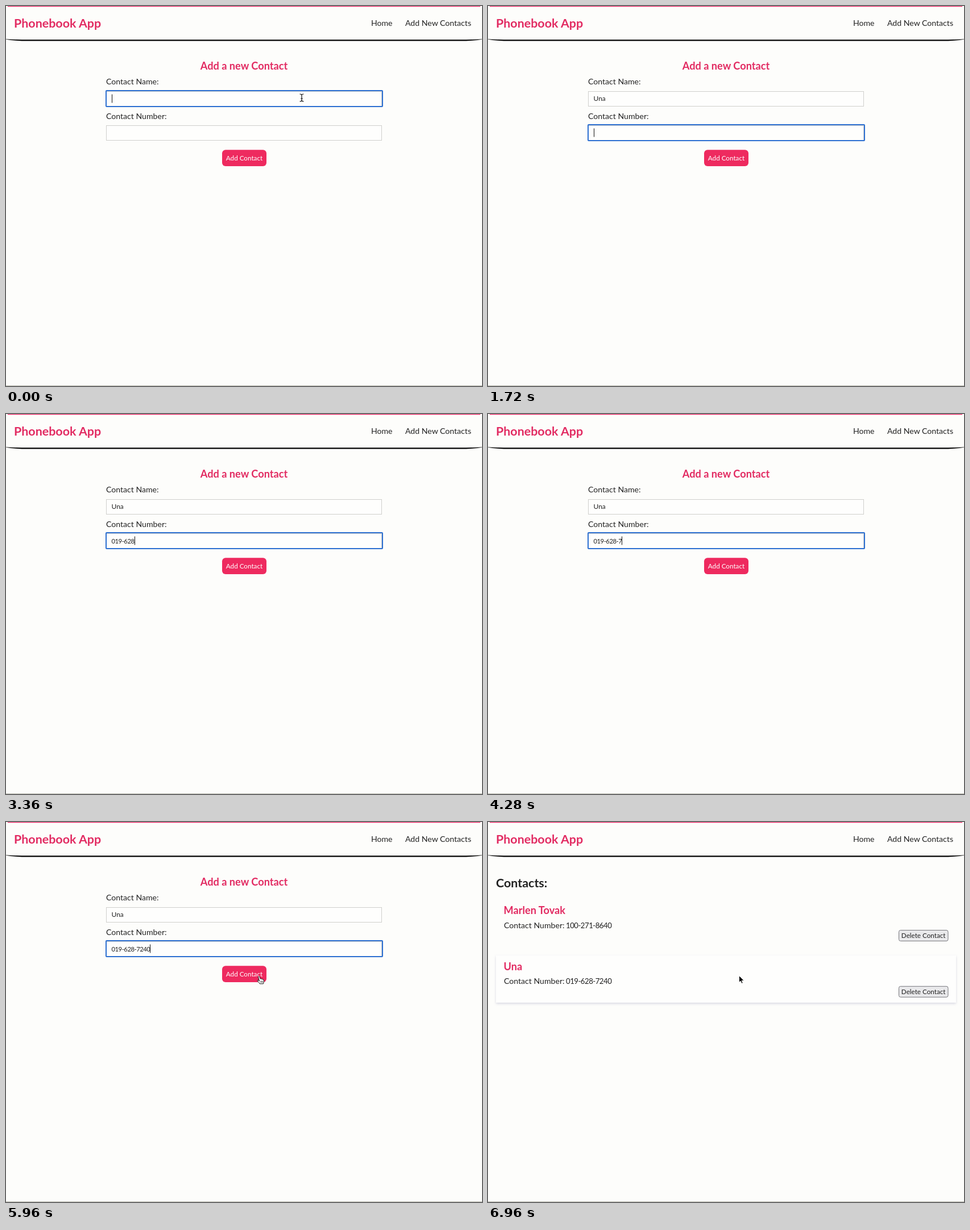
An HTML page for the animation above (7 s loop, 837x669 px).

```html
<!DOCTYPE html>
<html lang="en">
<head>
<meta charset="utf-8">
<title>Phonebook</title>
<style>
  html, body { margin: 0; width: 100%; height: 100%; overflow: hidden; background: #fdfdfb; }
  svg { display: block; width: 100%; height: 100%; }
  text { font: 14.1px Lato, "Open Sans", sans-serif; fill: #222; white-space: pre; }
  .title { font-size: 21.45px; font-weight: 700; }
  .heading { font-size: 18.2px; font-weight: 700; }
  .pink { fill: #e22b62; }
  .mid { text-anchor: middle; }
  .end { text-anchor: end; }
  .typed { font-size: 12px; }
  .small { font-size: 11.7px; }
  .digits { font-size: 13.2px; letter-spacing: -.5px; }
  .typed.digits { font-size: 11.3px; }
  .field { fill: #fefefd; stroke: #cfcfcc; }
  .focus { fill: none; stroke: #2c6fd1; stroke-width: 2; }
  .delete { fill: #e9e9eb; stroke: #77777c; }
  .card { fill: #fefefd; filter: drop-shadow(0 2px 2px rgba(160, 160, 190, .38)); }
</style>
</head>
<body>
<svg viewBox="0 0 837 669">
  <rect width="837" height="669" fill="#fdfdfb"/>
  <path d="M3 .5H834" stroke="#ee2f6c" stroke-width="1.3"/>
  <path d="M0 58.3Q15 59.3 40 59.3H797Q822 59.3 837 58.3V58.8Q823 61.6 797 61.6H40Q14 61.6 0 58.8Z"/>
  <path d="M0 668.5H837" stroke="#b9b9ae"/>
  <text class="title pink" x="14" y="37.5">Phonebook App</text>
  <text class="end" x="679.5" y="35.3">Home</text>
  <text class="end" x="818" y="35.3">Add New Contacts</text>

  <g id="form">
    <text class="heading pink mid" x="418.5" y="112">Add a new Contact</text>
    <text x="176" y="138.2">Contact Name:</text>
    <rect class="field" x="176.5" y="150.5" width="484" height="26"/>
    <text x="176" y="198.5">Contact Number:</text>
    <rect class="field" x="176.5" y="210.5" width="484" height="26"/>
    <rect id="focus" class="focus" x="176" width="486" height="28" rx="1"/>
    <text id="name" class="typed" x="185.5" y="167.4"></text>
    <text id="number" class="typed digits" x="185.5" y="227.6"></text>
    <path id="caret" d="M0 0V15" stroke="#111"/>
    <rect x="380" y="253.3" width="78" height="28.7" rx="6" fill="#ee2a5f"/>
    <text class="small mid" x="419" y="272" style="fill:#fff">Add Contact</text>
  </g>

  <g id="list">
    <text class="title" x="14" y="115.3">Contacts:</text>
    <rect class="card" x="14" y="235" width="809" height="83"/>
  </g>

  <g id="beam" fill="none">
    <path d="M-3.5 -6.5Q0 -6.5 0 -4.5Q0 -6.5 3.5 -6.5M0 -5V5M-3.5 6.5Q0 6.5 0 4.5Q0 6.5 3.5 6.5M-1.8 1.5H1.8" stroke="#fff" stroke-width="2.6"/>
    <path d="M-3.5 -6.5Q0 -6.5 0 -4.5Q0 -6.5 3.5 -6.5M0 -5V5M-3.5 6.5Q0 6.5 0 4.5Q0 6.5 3.5 6.5M-1.8 1.5H1.8" stroke="#111" stroke-width="1.2"/>
  </g>
  <path id="arrow" d="M0 0V12L2.7 9.5L4.6 13.8L6.7 12.9L4.8 8.7H8.6Z" fill="#000" stroke="#fff" stroke-width=".9"/>
  <g id="hand" stroke="#111" stroke-linejoin="round" stroke-linecap="round">
    <path d="M-1.3 1Q0 -.6 1.1 1L2.2 4.6Q3.4 3.7 4.2 5Q5.5 4.3 6.2 5.6Q8 5.2 8.3 7Q8.8 9.7 7.5 13.3H1.2Q.6 11.6 -2.6 8.7Q-3.6 7.3 -2.3 6.9Q-1 6.8 .3 8.3Z" fill="#fff"/>
    <path d="M2.8 8.5V11M4.6 8.5V11M6.3 8.5V11" stroke-width=".7"/>
  </g>
</svg>
<script>
const LOOP = 7000, SUBMIT = 6560, TAB = 1640;
const NAME = "Una", NUMBER = "019-628-7240";
const nameKeys = [640, 840, 1000];
const numberKeys = [1960, 2120, 2300, 2660, 2920, 3120, 3320, 3720, 4120, 4400, 4620, 4800];
const $ = id => document.getElementById(id);
const show = (el, on) => el.setAttribute("visibility", on ? "visible" : "hidden");
const move = (el, x, y) => el.setAttribute("transform", `translate(${x} ${y})`);

function addContact(y, name, number) {
  $("list").insertAdjacentHTML("beforeend", `
    <text class="heading pink" x="27.5" y="${y}">${name}</text>
    <text x="28" y="${y + 24.5}">Contact Number:</text>
    <text class="digits" x="137" y="${y + 24.5}">${number}</text>
    <rect class="delete" x="722.5" y="${y + 28.5}" width="86.5" height="19" rx="3"/>
    <text class="small mid" x="765.7" y="${y + 42.3}">Delete Contact</text>`);
}
addContact(162, "Marlen Tovak", "100-271-8640");
addContact(260.8, NAME, NUMBER);

const typed = (text, keys, t) => text.slice(0, keys.filter(k => k <= t).length);

function drawCaret(t, input, top) {
  const events = [0, ...nameKeys, TAB, ...numberKeys];
  const last = Math.max(...events.filter(k => k <= t));
  const width = input.textContent ? input.getComputedTextLength() : 0;
  move($("caret"), Math.round(185.5 + width) + .5, top + 6.5);
  show($("caret"), t < SUBMIT && (t - last) % 1000 < 500);
}

function drawPointer(t) {
  const u = Math.min(1, Math.max(0, (t - 5560) / 360));
  const ease = u * u * (3 - 2 * u);
  const x = 520 - 75 * ease, y = 161.5 + 110 * ease;
  const visible = t < nameKeys[0] || t >= 5560;
  const listed = t >= SUBMIT;
  const inField = y < 178 || (y > 209 && y < 238);
  const kind = listed ? "arrow" : inField ? "beam" : y > 253 ? "hand" : "arrow";
  for (const id of ["beam", "arrow", "hand"]) {
    show($(id), visible && id === kind);
    move($(id), listed ? 441.5 : x, listed ? 270.5 : y);
  }
}

function draw(t) {
  const onName = t < TAB, top = onName ? 149 : 209;
  $("name").textContent = typed(NAME, nameKeys, t);
  $("number").textContent = typed(NUMBER, numberKeys, t);
  $("focus").setAttribute("y", top);
  show($("form"), t < SUBMIT);
  show($("list"), t >= SUBMIT);
  drawCaret(t, onName ? $("name") : $("number"), top);
  drawPointer(t);
}

const start = performance.now();
function tick() {
  draw((performance.now() - start) % LOOP);
  requestAnimationFrame(tick);
}
tick();
</script>
</body>
</html>
```
